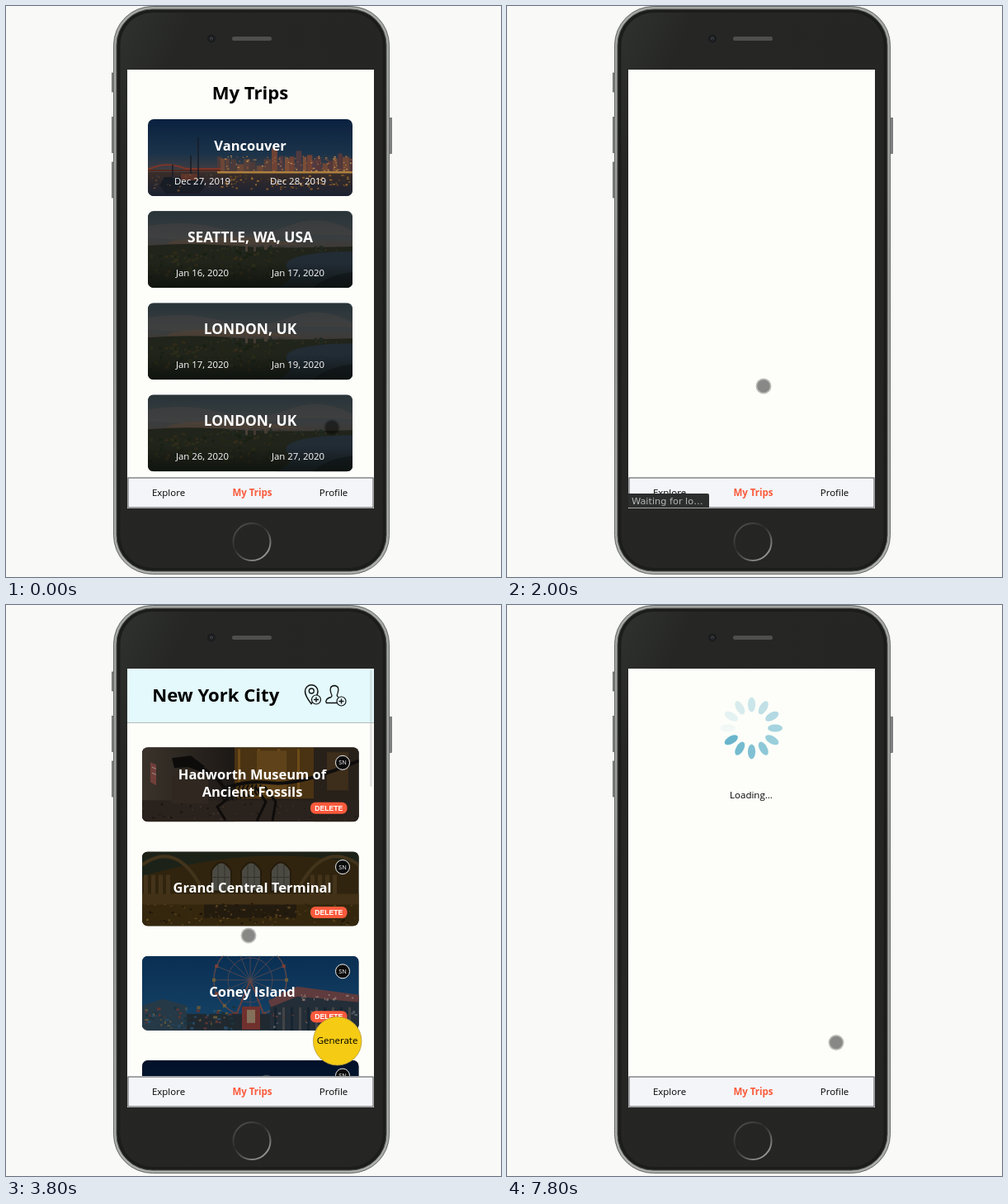
Write an HTML page that moves like this. It is 600x691 px and loops after 8000 ms.

```html
<!DOCTYPE html>
<html lang="en">
<head>
<meta charset="utf-8">
<title>Trip planner</title>
<style>
html, body { margin: 0; width: 100%; height: 100%; overflow: hidden; background: #f9f9f8; }
svg { display: block; width: 100%; height: 100%; }
text { font: 11.5px "Open Sans", "Noto Sans", sans-serif; text-anchor: middle; }
.h1 { font-size: 22.1px; font-weight: 700; }
.h2 { font-size: 16.5px; font-weight: 700; fill: #fff; }
.caps { font-size: 17.4px; }
.date { font-size: 11.4px; fill: #fff; }
.pill { font: 700 8.6px "Liberation Sans", Arial, sans-serif; fill: #fff; }
.tip { font: 11.3px "DejaVu Sans", sans-serif; fill: #b4b6b5; text-anchor: start; }
</style>
</head>
<body>
<svg id="stage" viewBox="0 0 600 691" xmlns="http://www.w3.org/2000/svg"></svg>
<script>
const LOOP = 8000, STEP = 200;
const PAGE = '#fdfef9', ORANGE = '#fb5a3c', HEADER = '#e3f9fc';

let seed = 7;
const rnd = (a = 0, b = 1) => {
  seed = (seed * 16807) % 2147483647;
  return a + (b - a) * seed / 2147483647;
};
const many = (n, fn) => Array.from({ length: n }, (_, i) => fn(i)).join('');
const rect = (x, y, w, h, fill, more = '') =>
  `<rect x="${x}" y="${y}" width="${w}" height="${h}" fill="${fill}" ${more}/>`;
const circle = (x, y, r, fill, more = '') =>
  `<circle cx="${x}" cy="${y}" r="${r}" fill="${fill}" ${more}/>`;
const path = (d, fill, more = '') => `<path d="${d}" fill="${fill}" ${more}/>`;
const line = (d, stroke, w = 1, more = '') =>
  path(d, 'none', `stroke="${stroke}" stroke-width="${w}" ${more}`);
const text = (x, y, s, cls = '', more = '') =>
  `<text x="${x}" y="${y}" class="${cls}" ${more}>${s}</text>`;
const grad = (id, stops, dir = 'x2="0" y2="1"') =>
  `<linearGradient id="${id}" ${dir}>` + stops.map(([o, c]) =>
    `<stop offset="${o}" stop-color="${c}"/>`).join('') + '</linearGradient>';
const specks = (n, x0, x1, y0, y1, colors, size = 2) => many(n, i =>
  rect(rnd(x0, x1).toFixed(1), rnd(y0, y1).toFixed(1), rnd(1, size + 1).toFixed(1),
    rnd(1, size).toFixed(1), colors[i % colors.length]));
const towers = (x0, x1, base, lo, hi, colors) => {
  let out = '';
  for (let x = x0, i = 0; x < x1; i++) {
    const w = rnd(4, 9), h = rnd(lo, hi);
    out += rect(x.toFixed(1), (base - h).toFixed(1), w.toFixed(1), h.toFixed(1), colors[i % colors.length]);
    x += w + rnd(-1, 2);
  }
  return out;
};

// Card pictures
const pics = {
  harbour: () => rect(0, 0, 248, 93, 'url(#dusk)') +
    towers(84, 150, 66, 8, 22, ['#4b3a39', '#6b4636', '#573f39']) +
    towers(150, 204, 66, 16, 32, ['#6f4235', '#503a40', '#7b4d38']) +
    towers(204, 248, 66, 10, 26, ['#55373a', '#6d4636']) +
    specks(110, 88, 246, 44, 64, ['#a5703f', '#87503a', '#c09050'], 1.5) +
    rect(0, 64, 248, 29, 'url(#bay)') +
    specks(95, 86, 246, 67, 84, ['#80562a', '#634422', '#99692f'], 2.2) +
    rect(84, 63, 164, 2.5, '#ad8140') +
    line('M0 61 Q22 50 46 60 H88', '#7d3529', 2) + rect(0, 61, 88, 2, '#54281f') +
    path('M14 80 L20 70 H62 L70 80 L62 90 H22Z', '#181c24') +
    line('M61 22 V80 M52 44 V76 M30 55 V74', '#171c26', 1.5) +
    rect(40, 66, 20, 8, '#5d3429') + specks(24, 4, 80, 66, 86, ['#6d4b33', '#333c46']),

  park: () => rect(0, 0, 248, 93, 'url(#eve)') +
    path('M0 18 Q50 10 90 22 T170 18 T248 24 V30 Q190 26 140 33 T0 32Z', '#484341', 'opacity=".45"') +
    path('M30 36 Q90 27 150 35 L190 41 H20Z', '#5a4430', 'opacity=".45"') +
    path('M0 42 Q50 38 100 42 T248 43 V93 H0Z', '#20241a') +
    specks(150, 0, 150, 45, 80, ['#2a2d19', '#332b1a', '#182013', '#252617'], 4) +
    specks(40, 80, 230, 41, 48, ['#322e23', '#202a23'], 3) +
    path('M248 49 Q205 49 180 56 Q162 62 170 72 Q180 82 156 93 H248Z', '#222c35') +
    path('M248 74 Q216 78 200 93 H248Z', '#171f24') +
    rect(118, 39, 3, 10, '#494037') + rect(128, 40, 3, 9, '#423a33') + rect(141, 39, 4, 8, '#463d34') +
    rect(0, 62, 248, 31, 'url(#fade)'),

  seattle: () => rect(0, 0, 248, 93, 'url(#haze)') +
    path('M166 77 L188 66 Q196 60 204 63 L218 70 L244 79Z', '#625254') +
    path('M0 82 Q120 70 248 78 V93 H0Z', '#292624') +
    towers(0, 76, 93, 14, 42, ['#191b1e', '#25252a', '#1e2023']) +
    towers(88, 160, 93, 12, 36, ['#1b1d20', '#2a292b', '#202126']) +
    specks(50, 2, 240, 70, 90, ['#3d3530', '#4c3c31'], 1.5) +
    path('M74 35 L82 30 H85 L93 35 L88 39 H79Z M83 24 h1 v8 h-1Z', '#151719') +
    path('M80 38 H87 L85 62 L89 93 H78 L82 62Z', '#1b1c1e'),

  statue: () => rect(0, 0, 248, 93, 'url(#night)') +
    '<ellipse cx="165" cy="66" rx="17" ry="54" fill="#34464d" transform="rotate(-29 165 66)"/>',

  museum: () => rect(0, 0, 263, 90, '#241d17') + rect(0, 0, 112, 90, 'url(#hall)') +
    rect(112, 0, 96, 62, '#4a3312') + many(4, i => rect(116 + i * 24, 2, 3, 58, '#6e4b17')) +
    rect(139, 4, 36, 54, '#5f4219') + rect(208, 0, 55, 90, '#28211a') +
    rect(224, 6, 26, 46, '#3d2d1b') + rect(0, 64, 263, 26, '#2a221c') +
    path('M36 68 V36 Q58 10 80 36 V68Z', '#302820') +
    path('M10 18 l7 3 v25 l-7 -4Z', '#713f3a') + line('M12 24 l5 2 M12 31 l5 2', '#9b8e83') +
    line('M74 26 Q91 35 100 50 Q124 39 157 43 T263 16', '#0f0d0c', 4) +
    path('M36 13 L59 10 L76 23 L72 30 L56 24 L39 25Z', '#0e0c0b') +
    many(10, i => line(`M${99 + i * 5} 45 q-5 9 1 ${21 - i}`, '#12100d', 2)) +
    line('M104 62 L91 72 L101 88 M137 47 L150 66 L139 89 M148 47 L162 66 L158 89', '#0e0c0b', 3) +
    specks(45, 0, 260, 67, 88, ['#40322a', '#17130f']),

  terminal: () => rect(0, 0, 263, 90, '#30240f') +
    path('M0 0 H263 V14 Q130 -10 0 30Z', '#1d2218') +
    many(2, i => line(i ? 'M190 44 Q220 -14 263 16' : 'M72 44 Q42 -14 0 16', '#42341b', 4)) +
    many(3, i => path(`M${84 + i * 36} 48 V23 q12 -20 24 0 V48Z`, '#4b4a42',
      'stroke="#251a0a" stroke-width="2"') +
      line(`M${92 + i * 36} 15 V48 M${100 + i * 36} 15 V48 M${84 + i * 36} 31 h24`, '#35322a')) +
    many(8, i => rect(2 + i * 9 + (i > 3 ? 166 : 0), 28, 5, 28, '#43331a')) +
    rect(0, 51, 263, 14, '#423116') + rect(0, 64, 263, 26, '#34270e') +
    rect(75, 64, 112, 16, '#241b0f') +
    specks(130, 5, 258, 62, 88, ['#503a17', '#1d150a', '#5f471d', '#382a10'], 2.5),

  fair: () => rect(0, 0, 263, 90, 'url(#sea)') +
    circle(131, 29, 44, 'none', 'stroke="#5a4549" stroke-width="1.5"') +
    circle(131, 29, 27, 'none', 'stroke="#4c4350"') +
    many(16, i => {
      const a = i * Math.PI / 8, x = 131 + 44 * Math.cos(a), y = 29 + 44 * Math.sin(a);
      return line(`M131 29 L${x.toFixed(1)} ${y.toFixed(1)}`, '#4d4650') +
        rect((x - 2).toFixed(1), (y - 2).toFixed(1), 4, 4, i % 2 ? '#7a4036' : '#6c5c39');
    }) + line('M131 29 L110 82 M131 29 L152 82', '#663f3e', 2) +
    rect(0, 70, 263, 20, '#20292f') + path('M0 60 L25 52 L54 60 V90 H0Z', '#263947') +
    specks(85, 0, 110, 60, 88, ['#5c3533', '#274a66', '#62563a', '#1b333f'], 4) +
    rect(121, 61, 22, 28, '#70302d') + rect(127, 65, 10, 16, '#84705a') +
    path('M155 53 L188 38 L263 48 V90 H155Z', '#232e38') +
    path('M153 54 L188 37 L263 47 V56 L188 49 L156 62Z', '#5f3b3d') +
    specks(16, 190, 256, 46, 52, ['#87706c'], 3) +
    many(10, i => rect(160 + i * 10, 62, 3, 28, i % 2 ? '#424447' : '#16242f')) +
    specks(30, 158, 260, 66, 86, ['#553835', '#575f66'], 3)
};

const defs = '<defs>' +
  grad('dusk', [[0, '#0b2140'], [.45, '#1b3349'], [.72, '#4a4040']]) +
  grad('bay', [[0, '#3a2d28'], [1, '#1a2132']]) +
  grad('eve', [[0, '#283439'], [.35, '#393d3f'], [.55, '#423831']]) +
  grad('fade', [[0, 'rgba(9,13,10,0)'], [1, 'rgba(9,13,10,.7)']]) +
  grad('haze', [[0, '#394348'], [.5, '#4b4442'], [1, '#5a443c']]) +
  grad('night', [[0, '#021129'], [1, '#04203f']]) +
  grad('hall', [[0, '#3a332b'], [1, '#1c1815']], '') +
  grad('sea', [[0, '#0a2f53'], [1, '#154468']]) +
  grad('metal', [[0, '#a5a8a5'], [.5, '#979a97'], [1, '#adafad']]) +
  grad('glass', [[0, '#30322f'], [.14, '#262725'], [1, '#252624']], 'x2="1" y2="1"') +
  grad('ring', [[0, '#5a5a57'], [.45, '#2b2b29'], [.65, '#50504d'], [1, '#a2a29e']], 'x2=".8" y2="1"') +
  '<clipPath id="screen"><rect x="147" y="77" width="299" height="531"/></clipPath>' +
  '<clipPath id="small"><rect width="248" height="93" rx="7"/></clipPath>' +
  '<clipPath id="wide"><rect width="262.5" height="90" rx="7"/></clipPath>' +
  Object.keys(pics).map(k => `<g id="${k}">${pics[k]()}</g>`).join('') + '</defs>';

// Phone body
const sideKey = (x, y, h) => rect(x, y, 4, h, '#7e817f', 'stroke="#5a5c5a" stroke-width=".7"');
const phone = rect(0, 0, 600, 691, '#f9f9f8') +
  sideKey(128.4, 81, 23) + sideKey(128.4, 134.5, 43) + sideKey(128.4, 189, 43) + sideKey(463.4, 135.5, 43) +
  rect(130.5, .5, 334, 687, 'url(#metal)', 'rx="47" stroke="#666966"') +
  rect(134, 4, 327, 680, '#1c1d1b', 'rx="43.5" stroke="#4a4c4a"') +
  rect(138.5, 8, 318, 672, 'url(#glass)', 'rx="39"') +
  rect(274, 37, 48, 5, '#4f504e', 'rx="2.5"') +
  circle(249, 39.5, 5, '#1a1c1e') + circle(249, 39.5, 2, '#42464b') + circle(249, 39.8, .9, '#111') +
  circle(298, 648.5, 22.5, 'none', 'stroke="url(#ring)" stroke-width="2"');

const backdrop = rect(147, 77, 299, 531, PAGE);

// First page: list of trips
const trips = [
  ['Vancouver', 'Dec 27, 2019', 'Dec 28, 2019', 'harbour'],
  ['SEATTLE, WA, USA', 'Jan 16, 2020', 'Jan 17, 2020', 'park'],
  ['LONDON, UK', 'Jan 17, 2020', 'Jan 19, 2020', 'park'],
  ['LONDON, UK', 'Jan 26, 2020', 'Jan 27, 2020', 'park'],
  ['Seattle', 'Apr 04, 2020', 'Apr 10, 2020', 'seattle'],
  ['New York City', 'Jun 10, 2020', 'Jun 13, 2020', 'statue']
];
const tripList = backdrop + text(296, 113, 'My Trips', 'h1') +
  trips.map(([name, from, to, pic], i) => `<g transform="translate(172 ${137 + i * 111.1})">
    <g clip-path="url(#small)"><use href="#${pic}"/></g>` +
    text(124, 37.5, name, name === name.toUpperCase() ? 'h2 caps' : 'h2') +
    text(66, 78.5, from, 'date') + text(182, 78.5, to, 'date') + '</g>').join('');

// Second page: places of one trip
const plus = (x, y) => circle(x, y, 5.5, HEADER, 'stroke="#111" stroke-width="1.2"') +
  line(`M${x - 3} ${y} h6 M${x} ${y - 3} v6`, '#111', 1.4);
const header = rect(147, 77, 299, 65, HEADER) + rect(147, 142, 299, 1, '#b4bcbd') +
  text(254.2, 117, 'New York City', 'h1') +
  line('M370 119.5 Q362.5 110 362.5 104.5 A7.7 7.7 0 0 1 378 104.5 Q378 110 370 119.5Z', '#111', 1.5) +
  circle(370.3, 104, 3, 'none', 'stroke="#111" stroke-width="1.3"') + plus(376, 114.5) +
  line('M388 118.5 Q387 113 394 111.5 Q396 110 394 107 Q391 98 398 97.5 Q405 98 402 107 Q400 110 403 111.5 M388 118.5 H401', '#111', 1.3) +
  plus(406.5, 116.5);
const places = [
  [['Hadworth Museum of', 'Ancient Fossils'], 'museum'],
  [['Grand Central Terminal'], 'terminal'],
  [['Coney Island'], 'fair'],
  [['Statue of Liberty'], 'statue']
];
const placeList = backdrop + header + places.map(([lines, pic], i) => {
  const fit = pic === 'statue' ? 'transform="scale(1.06 .97)"' : '';
  return `<g transform="translate(165 ${172.3 + i * 126.25})"><g clip-path="url(#wide)">` +
    rect(0, 0, 263, 90, '#565656') + `<use id="p-${pic}" href="#${pic}" ${fit}/></g>` +
    lines.map((s, j) => text(133.5, (lines.length > 1 ? 39 : 49.5) + j * 21, s, 'h2')).join('') +
    circle(243, 18.5, 8.5, '#0b0b0b', 'stroke="#eee"') +
    text(243, 21.2, 'SN', '', 'style="font-size:7.4px;fill:#fff"') +
    rect(204, 66.5, 44.5, 14, ORANGE, 'rx="6"') + text(226.2, 76.6, 'DELETE', 'pill') + '</g>';
}).join('');

// Loading page
const petals = many(12, i =>
  `<ellipse class="petal" cx="296.5" cy="120.5" rx="4.6" ry="9" fill="#68b5cc" transform="rotate(${i * 30} 296.5 149)"/>`);

const nav = rect(147, 570, 299, 38, '#fff') +
  rect(148, 571, 297, 36, '#f3f5f9', 'stroke="#4a4c4e"') +
  text(197, 593, 'Explore') + text(397, 593, 'Profile') +
  text(298.5, 593, 'My Trips', '', `style="font-weight:700;fill:${ORANGE}"`);

document.getElementById('stage').innerHTML = defs + phone + '<g clip-path="url(#screen)">' +
  rect(147, 77, 299, 531, '#fff') +
  `<g id="trips">${tripList}</g><g id="places">${placeList}</g>` +
  `<g id="loading">${backdrop}${petals}${text(296, 234, 'Loading...')}</g>` +
  `<g id="blank">${backdrop}</g>` + nav +
  `<g id="generate">${circle(401.7, 527.7, 29.3, '#f5cb14', 'stroke="#b39c3c" stroke-width=".8"')}${text(401.5, 531.3, 'Generate')}</g>` +
  `<g id="tip">${path('M147 590 H243 q2 0 2 2 V607 H147Z', '#2c2e2d')}${text(151, 603, 'Waiting for lo…', 'tip')}</g>` +
  rect(441, 79, 3, 100, '#a9abad', 'id="thumb" rx="1.5"') +
  `<g id="pointer">${circle(0, 0, 9.5, '#000', 'opacity=".25"')}${circle(0, 0, 7.8, '#000', 'opacity=".28"')}</g></g>`;

// Tracks: each entry holds from its time until the next one
const pageTrack = [[0, 'trips'], [2000, 'blank'], [2400, 'places'], [6200, 'loading']];
const scrollTrack = [[0, 0], [200, 40], [400, 190], [600, 285], [2000, 0],
  [2600, 60], [2800, 100], [3000, 45], [3200, 0]];
const thumbTrack = [[0, 0], [200, 1], [800, .5], [1000, 0], [2600, 1], [3600, .6], [3800, .3], [4000, 0]];
const pointerTrack = [[0, 395, 510], [1400, 407, 497], [1600, 311, 460], [2600, 300, 490],
  [2800, 292, 510], [3600, 293, 470], [3800, 294, 400], [4000, 295, 330], [4200, 296, 292],
  [4600, 304, 330], [4800, 318, 390], [5000, 332, 441], [5200, 362, 480], [5400, 392, 515],
  [5600, 404.5, 530], [5800, 399, 529.5]];
const hold = (track, t) => track.filter(k => k[0] <= t).pop().slice(1);

const el = id => document.getElementById(id);
const set = (id, name, value) => el(id).setAttribute(name, value);
const show = (id, on) => set(id, 'visibility', on ? 'visible' : 'hidden');
const petalNodes = [...document.querySelectorAll('.petal')];

function draw(t) {
  const [page] = hold(pageTrack, t), [scroll] = hold(scrollTrack, t);
  for (const id of ['trips', 'places', 'loading', 'blank']) show(id, id === page);
  show('generate', page === 'places');
  show('tip', t >= 2000 && t < 2200);
  show('p-museum', page === 'places' && t >= 3200);
  set('trips', 'transform', `translate(0 ${-scroll})`);
  set('places', 'transform', `translate(0 ${-scroll})`);

  const content = t < 2000 ? 829 : 2000;
  set('thumb', 'y', 79 + scroll * 531 / content);
  set('thumb', 'height', 531 * 531 / content);
  set('thumb', 'opacity', hold(thumbTrack, t)[0]);
  set('pointer', 'transform', `translate(${hold(pointerTrack, t).join(' ')})`);

  const phase = (t - 6200) / 1000 + 10.07;
  petalNodes.forEach((p, i) => p.setAttribute('opacity', (1 - (phase - i / 12) % 1).toFixed(3)));
}

const start = performance.now();
function tick() {
  const t = (performance.now() - start + 2) % LOOP;
  draw(Math.floor(t / STEP) * STEP);
  requestAnimationFrame(tick);
}
tick();
</script>
</body>
</html>
```
